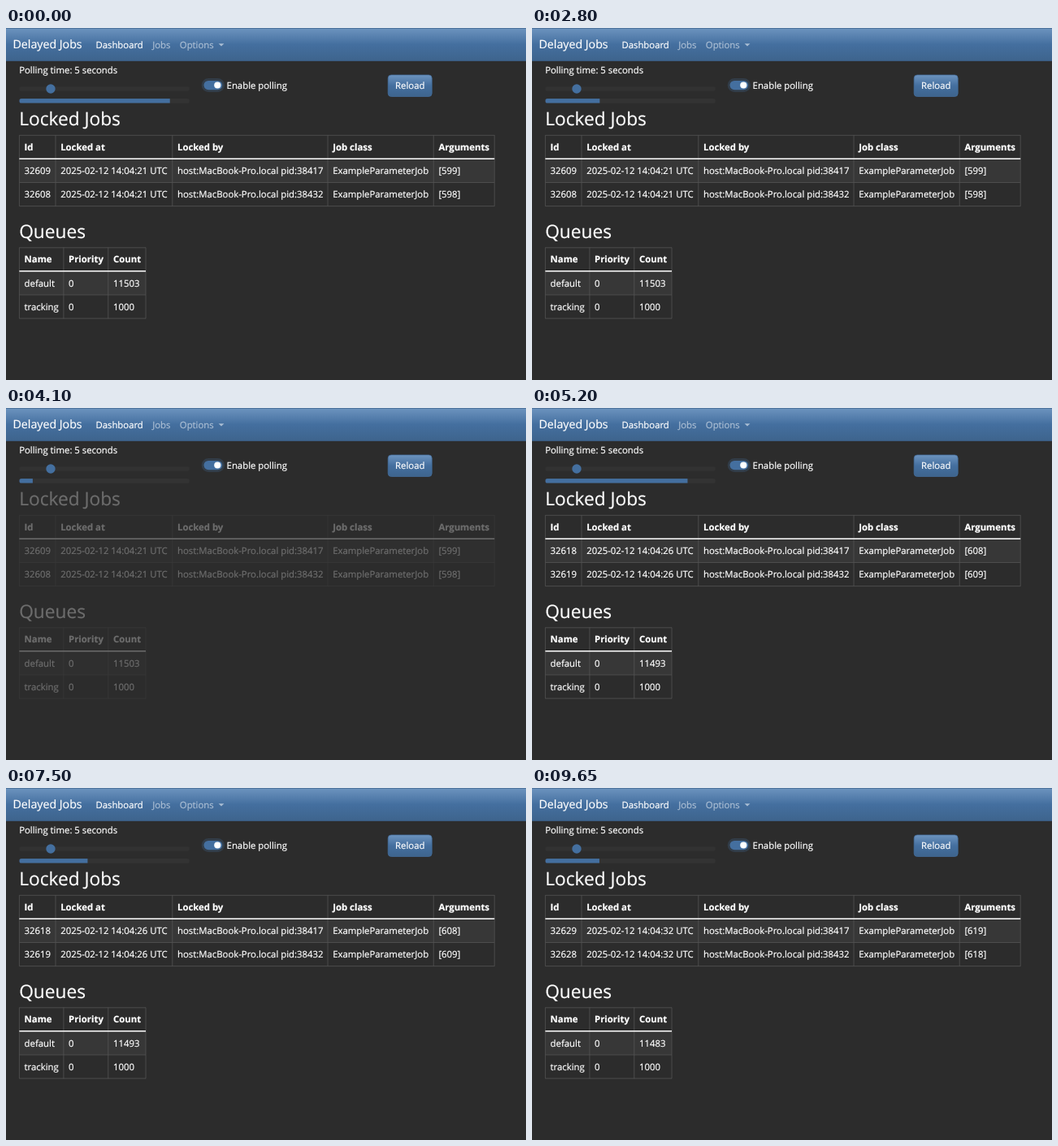
Recreate the animation shown at these times as an HTML page. Size 640x434 px, loop 9800 ms.

```html
<!DOCTYPE html>
<html lang="en">
<head>
<meta charset="utf-8">
<title>Delayed Jobs</title>
<style>
  html, body { margin: 0; width: 100%; height: 100%; overflow: hidden; background: #2c2c2c; }
  svg { display: block; width: 640px; height: 434px; }
  text {
    font: 11.35px "Open Sans", sans-serif; white-space: pre;
    text-rendering: geometricPrecision; fill: #fff; stroke: #fff; stroke-width: .2px;
  }
  .brand { font-size: 14.19px; }
  .heading { font-size: 22.7px; }
  .bold { font-weight: 700; }
  .muted { opacity: .55; }
</style>
</head>
<body>
<svg id="stage" viewBox="0 0 640 434">
  <defs>
    <linearGradient id="blue" x2="0" y2="1">
      <stop stop-color="#6d94bf"/>
      <stop offset=".5" stop-color="#446f9f"/>
      <stop offset="1" stop-color="#3e648d"/>
    </linearGradient>
    <clipPath id="progressClip"><rect x="16.3" y="87.1" width="209.5" height="5.6" rx="2.8"/></clipPath>
  </defs>
</svg>
<script>
const LOOP = 9800, TICK = 500, TRANSITION = 600, RESPONSE = 200;
const PRIMARY = '#446f9f', BORDER = '#555';
const stage = document.getElementById('stage');

function add(tag, attrs, parent = stage) {
  const node = document.createElementNS('http://www.w3.org/2000/svg', tag);
  for (const name in attrs) node.setAttribute(name, attrs[name]);
  return parent.appendChild(node);
}
function rect(x, y, width, height, fill, extra = {}, parent = stage) {
  return add('rect', { x, y, width, height, fill, ...extra }, parent);
}
function label(x, y, content, className = '', parent = stage) {
  const node = add('text', { x, y, class: className }, parent);
  node.textContent = content;
  return node;
}

// Navigation bar
rect(0, 0, 640, 40.6, 'url(#blue)');
rect(0, 0, 640, .7, '#3e648d');
rect(0, 40, 640, .7, '#3a5d84');
label(8.5, 25.4, 'Delayed Jobs', 'brand');
label(110.4, 24.5, 'Dashboard');
label(180.2, 24.5, 'Jobs', 'muted');
label(213.8, 24.5, 'Options', 'muted');
add('path', { d: 'M261.6 19.2h6.8l-3.4 3.4z', fill: '#fff', opacity: .55 });

// Polling controls
label(16.2, 56.4, 'Polling time: 5 seconds');
rect(16.3, 72.2, 209.5, 5.6, '#323232', { rx: 2.8 });
add('circle', { cx: 55, cy: 75, r: 5.7, fill: PRIMARY });
rect(16.3, 87.1, 209.5, 5.6, '#333', { rx: 2.8 });
const progress = rect(16.3, 87.1, 0, 5.6, PRIMARY, { 'clip-path': 'url(#progressClip)' });
rect(240.7, 62, 28.4, 17, PRIMARY, { rx: 8.5, 'fill-opacity': .25 });
rect(243.5, 64.9, 22.7, 11.3, PRIMARY, { rx: 5.65 });
add('circle', { cx: 260.3, cy: 70.5, r: 4.1, fill: '#fff' });
label(271.6, 75, 'Enable polling');
rect(470.2, 57.9, 54, 26.6, 'url(#blue)', { rx: 4, stroke: PRIMARY, 'stroke-width': .7 });
label(479.1, 75.4, 'Reload');

// Tables: columns holds the vertical rules; the returned cells are indexed [row][column]
const content = add('g', {});
function table(columns, top, headers, rowCount) {
  const row = 29.1, left = columns[0], right = columns[columns.length - 1];
  const bottom = top + row * (rowCount + 1) + .4;
  rect(left, top + row, right - left, row, '#373737', {}, content);
  const rule = (d, stroke = BORDER, width = .8) =>
    add('path', { d, stroke, 'stroke-width': width }, content);
  columns.forEach(x => rule(`M${x} ${top}V${bottom}`));
  for (let i = 0; i <= rowCount + 1; i++) {
    if (i !== 1) rule(`M${left} ${Math.min(top + row * i + .2, bottom)}H${right}`);
  }
  rule(`M${left} ${top + row}H${right}`, '#fff', 1.5);
  headers.forEach((name, c) => label(columns[c] + 6.2, top + 18.5, name, 'bold', content));
  return Array.from({ length: rowCount }, (_, r) => headers.map((_, c) =>
    label(columns[c] + 6.2, top + 19.1 + row * (r + 1), '', '', content)));
}
function fill(cells, values) {
  cells.forEach((cell, i) => {
    if (cell.textContent !== String(values[i])) cell.textContent = values[i];
  });
}

label(16.2, 119.8, 'Locked Jobs', 'heading', content);
const jobs = table([16.4, 61, 204.8, 396, 526.2, 601.2], 132.1,
  ['Id', 'Locked at', 'Locked by', 'Job class', 'Arguments'], 2);
label(16.2, 259.1, 'Queues', 'heading', content);
const queues = table([16.4, 70.9, 125.8, 172], 270.6, ['Name', 'Priority', 'Count'], 2);
fill(queues[1], ['tracking', 0, 1000]);

const snapshots = [
  { ids: [32609, 32608], second: 21, count: 11503 },
  { ids: [32618, 32619], second: 26, count: 11493 },
  { ids: [32629, 32628], second: 32, count: 11483 },
];
const pids = [38417, 38432];

function showSnapshot({ ids, second, count }) {
  ids.forEach((id, i) => fill(jobs[i], [id, `2025-02-12 14:04:${second} UTC`,
    `host:MacBook-Pro.local pid:${pids[i]}`, 'ExampleParameterJob', `[${id - 32010}]`]));
  fill(queues[0], ['default', 0, count]);
}

const cursor = add('path', {
  d: 'M0 0V10.4L2.4 8.3 4 12 5.8 11.2 4.2 7.6H7.4Z',
  fill: '#000', stroke: '#fff', 'stroke-width': .9, 'stroke-linejoin': 'round',
});
const cursorPath = [[100, 83, 20], [1000, 188, 168], [1700, 547.5, 334.8], [1900, 618, 346]];

function moveCursor(t) {
  const next = cursorPath.findIndex(([time]) => time > t);
  const last = cursorPath[cursorPath.length - 1];
  const visible = next > 0 || t === last[0];
  cursor.setAttribute('visibility', visible ? 'visible' : 'hidden');
  if (!visible) return;
  const end = next > 0 ? cursorPath[next] : last;
  const start = next > 0 ? cursorPath[next - 1] : last;
  const f = end === start ? 0 : (t - start[0]) / (end[0] - start[0]);
  const at = i => start[i] + (end[i] - start[i]) * f;
  cursor.setAttribute('transform', `translate(${at(1)} ${at(2)})`);
}

// CSS "ease": cubic-bezier(.25, .1, .25, 1)
function ease(x) {
  const bezier = (a, b, s) => 3 * a * s * (1 - s) ** 2 + 3 * b * s * s * (1 - s) + s ** 3;
  let low = 0, high = 1;
  for (let i = 0; i < 20; i++) {
    const mid = (low + high) / 2;
    if (bezier(.25, .25, mid) < x) low = mid; else high = mid;
  }
  return bezier(.1, 1, low);
}

// Each tick starts a transition that the next tick interrupts.
function progressAt(t) {
  let value = 0;
  for (let k = -1; k * TICK <= t; k++) {
    const goal = ((8 - k) % 10 + 10) % 10 / 10;
    value += (goal - value) * ease(Math.min(TICK, t - k * TICK) / TRANSITION);
  }
  return value;
}

function sampleTime(ms) {
  if (ms >= 9650) return 9635;
  return Math.min(9500, Math.floor(ms / 100) * 100);
}

function draw(ms) {
  const t = sampleTime(ms);
  const sinceReload = t < 4000 ? Infinity : (t - 4000) % 5000;
  content.setAttribute('opacity', sinceReload < RESPONSE ? .3 : 1);
  showSnapshot(snapshots[Math.max(0, Math.floor((t + 1000 - RESPONSE) / 5000))]);
  progress.setAttribute('width', 209.5 * progressAt(t));
  moveCursor(t);
}

const began = performance.now();
function loop() {
  draw((performance.now() - began) % LOOP);
  requestAnimationFrame(loop);
}
loop();
</script>
</body>
</html>
```
